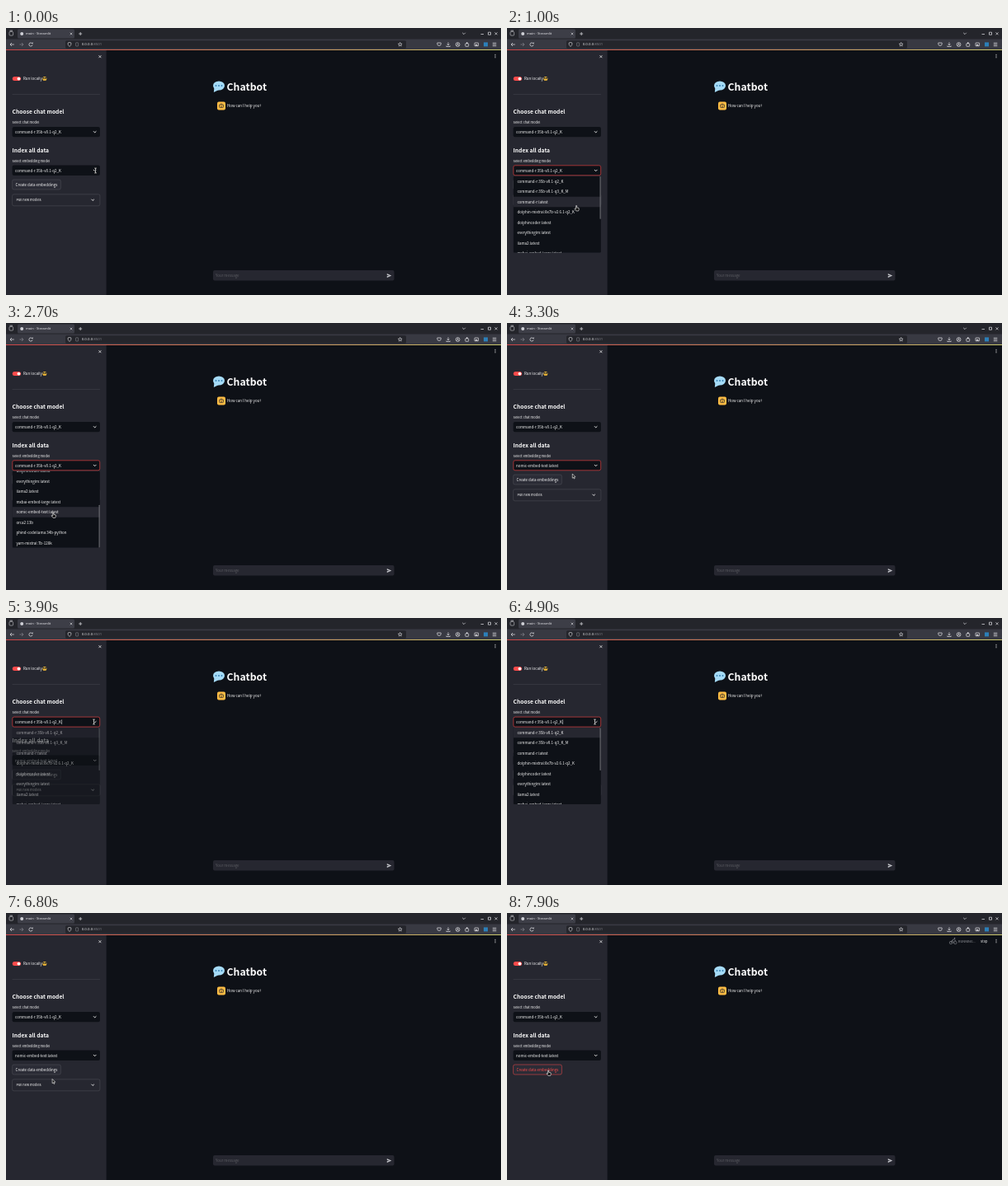
Animation of 600x324 px, one loop 8000 ms. Source, as an HTML page with a canvas:

```html
<!DOCTYPE html>
<html lang="en">
<head>
<meta charset="utf-8">
<title>Chatbot</title>
<style>
html, body { margin: 0; width: 100%; height: 100%; overflow: hidden; background: #0e1117; }
canvas { display: block; width: 600px; height: 324px; }
</style>
</head>
<body>
<canvas id="stage" width="600" height="324"></canvas>
<script>
const ctx = document.getElementById('stage').getContext('2d');
const LOOP = 8000;
const TAU = Math.PI * 2;
const SANS = '"Noto Sans CJK JP", "Noto Sans CJK SC", "Noto Sans CJK", "Noto Sans", sans-serif';
const CHROME_FONT = '"Noto Sans", sans-serif';
const BG = '#0e1117', SIDE = '#262730', FG = '#fafafa', RED = '#ff4b4b';
const FAINT = 'rgba(250,250,250,0.2)';
const ROW = 12.5, PANEL_H = 93, MAX_SCROLL = 56.5, THUMB = 52;

const MODELS = [
  'command-r:35b-v0.1-q2_K', 'command-r:35b-v0.1-q3_K_M', 'command-r:latest',
  'dolphin-mixtral:8x7b-v2.6.1-q2_K', 'dolphincoder:latest', 'everythinglm:latest',
  'llama2:latest', 'mxbai-embed-large:latest', 'nomic-embed-text:latest',
  'orca2:13b', 'phind-codellama:34b-python', 'yarn-mistral:7b-128k'
];

// time, x, y of the pointer's hot spot
const PATH = [
  [0, 108.5, 173], [550, 108.5, 173], [1400, 63, 251], [2250, 63, 251],
  [2650, 56.8, 230], [2950, 56.8, 230], [3700, 106.5, 126], [5250, 106.5, 126],
  [5950, 91, 258.5], [6200, 91, 258.5], [7000, 49.7, 191]
];

const clamp = (v, a, b) => Math.min(b, Math.max(a, v));
const ramp = (t, a, b) => clamp((t - a) / (b - a), 0, 1);
const ease = p => p * p * (3 - 2 * p);

function pointerAt(t) {
  for (let i = 1; i < PATH.length; i++) {
    const [t0, x0, y0] = PATH[i - 1], [t1, x1, y1] = PATH[i];
    if (t < t1) {
      const p = ease(ramp(t, t0, t1));
      return { x: x0 + (x1 - x0) * p, y: y0 + (y1 - y0) * p };
    }
  }
  const [, x, y] = PATH[PATH.length - 1];
  return { x, y };
}

function fill(x, y, w, h, color, r = 0) {
  ctx.fillStyle = color;
  ctx.beginPath();
  ctx.roundRect(x, y, w, h, r);
  ctx.fill();
}

function outline(x, y, w, h, color, r = 0, lw = 0.5) {
  ctx.strokeStyle = color;
  ctx.lineWidth = lw;
  ctx.beginPath();
  ctx.roundRect(x, y, w, h, r);
  ctx.stroke();
}

function line(points, color, lw = 0.7) {
  ctx.strokeStyle = color;
  ctx.lineWidth = lw;
  ctx.beginPath();
  points.forEach(([x, y], i) => i ? ctx.lineTo(x, y) : ctx.moveTo(x, y));
  ctx.stroke();
}

function poly(points, color) {
  ctx.fillStyle = color;
  ctx.beginPath();
  points.forEach(([x, y]) => ctx.lineTo(x, y));
  ctx.closePath();
  ctx.fill();
}

function dot(x, y, r, color) {
  ctx.fillStyle = color;
  ctx.beginPath();
  ctx.arc(x, y, r, 0, TAU);
  ctx.fill();
}

function ring(x, y, r, color, lw = 0.7, a = 0, b = TAU) {
  ctx.strokeStyle = color;
  ctx.lineWidth = lw;
  ctx.beginPath();
  ctx.arc(x, y, r, a, b);
  ctx.stroke();
}

// Laid out at ten times the size so small glyphs keep fractional advances.
function text(str, x, y, size, color = FG, weight = 400, family = SANS) {
  const px = family === SANS ? size / 1.117 : size;
  ctx.save();
  ctx.translate(x, y + size * 0.33);
  ctx.scale(0.1, 0.1);
  ctx.font = `${weight} ${px * 10}px ${family}`;
  ctx.fillStyle = color;
  ctx.fillText(str, 0, 0);
  ctx.restore();
}

const chevron = (x, y, color = FG, s = 1.7, lw = 0.9) =>
  line([[x - s, y - s / 2], [x, y + s / 2], [x + s, y - s / 2]], color, lw);

function cross(x, y, s, color, lw = 0.7) {
  line([[x - s, y - s], [x + s, y + s]], color, lw);
  line([[x - s, y + s], [x + s, y - s]], color, lw);
}

function drawBrowser() {
  const ink = '#e4e4e8', dim = '#85868d';
  fill(0, 0, 600, 14, '#24252b');
  fill(0, 13.5, 600, 13, '#383942');
  fill(14, 1.5, 69, 11, '#3d3e47', 1.5);
  outline(4, 4.5, 4.6, 4.6, ink, 1);
  line([[4.5, 3.2], [8, 3.2]], ink);
  dot(19.2, 7, 2, '#cfd0d6');
  text('main · Streamlit', 24, 7, 4.1, ink, 400, CHROME_FONT);
  cross(79, 7, 1.3, ink, 0.6);
  line([[88.2, 7], [92.2, 7]], ink);
  line([[90.2, 5], [90.2, 9]], ink);
  chevron(555, 6.7, ink, 1.8, 0.7);
  line([[575.5, 7.5], [579, 7.5]], ink);
  outline(584.5, 5.2, 3, 3, ink, 0, 0.7);
  cross(594, 6.8, 1.5, ink);

  line([[9.8, 20], [5, 20]], ink);
  line([[7, 18], [5, 20], [7, 22]], ink);
  line([[16.5, 20], [21, 20]], dim);
  line([[19, 18], [21, 20], [19, 22]], dim);
  ring(30, 20, 2.1, ink, 0.7, 0.2, 5.4);
  poly([[30.7, 18.8], [32.6, 19.2], [32.5, 17.2]], ink);

  fill(72, 15.3, 413, 9.4, '#24252b', 1.5);
  line([[77, 17.4], [79, 18.1], [78.7, 20.6], [77, 22.5], [75.3, 20.6], [75, 18.1], [77, 17.4]], ink, 0.6);
  outline(84.6, 17.8, 3, 4.2, dim, 0.5, 0.6);
  text('0.0.0.0', 91.7, 20, 4.35, ink, 400, CHROME_FONT);
  text(':8501', 105.1, 20, 4.35, dim, 400, CHROME_FONT);
  const star = Array.from({ length: 11 }, (_, i) => {
    const r = i % 2 ? 1.1 : 2.5, a = i * Math.PI / 5 - Math.PI / 2;
    return [477.7 + r * Math.cos(a), 20 + r * Math.sin(a)];
  });
  line(star, ink, 0.6);

  ring(525, 19.3, 2.2, ink, 0.7, 0, Math.PI);
  line([[522.8, 19.3], [522.8, 18], [527.2, 18], [527.2, 19.3]], ink);
  line([[536, 17.4], [536, 20.8]], ink);
  chevron(536, 20.3, ink, 1.4, 0.7);
  line([[533.8, 21.5], [533.8, 22.5], [538.2, 22.5], [538.2, 21.5]], ink);
  ring(547.6, 20, 2.4, ink);
  dot(547.6, 19.3, 0.8, ink);
  ring(547.6, 21.8, 1.3, ink, 0.6, Math.PI, TAU);
  outline(556.8, 18.8, 3.9, 3.5, ink, 0.5, 0.7);
  dot(558.8, 18.2, 0.9, ink);
  outline(568, 18, 4.6, 3.8, ink, 0.4, 0.7);
  poly([[568.4, 21.4], [570, 19.5], [572.2, 21.4]], ink);
  fill(579, 17.4, 5, 5, '#2c7fb8');
  for (const y of [18.2, 20, 21.8]) line([[589.8, y], [594.3, y]], ink);
}

function drawMain(running) {
  fill(121.5, 26, 479, 298, BG);
  for (const y of [32.2, 34, 35.8]) dot(593, y, 0.55, FG);
  if (running) drawRunning();

  // speech balloon
  ctx.fillStyle = '#a5dbf7';
  ctx.beginPath();
  ctx.ellipse(258, 70, 7, 5.5, 0, 0, TAU);
  ctx.fill();
  poly([[252.5, 72], [251.8, 78], [258, 75]], '#a5dbf7');
  for (const x of [254.5, 258, 261.5]) dot(x, 70, 1, '#3c85b5');
  text('Chatbot', 267.5, 71.3, 13.75, FG, 700);

  // bot avatar
  fill(256, 89.4, 10, 10, '#ffbd45', 2);
  outline(258.6, 92.7, 4.8, 3.9, '#33302a', 0.8, 0.8);
  dot(260.1, 94, 0.5, '#33302a');
  dot(261.9, 94, 0.5, '#33302a');
  line([[260, 95.5], [262, 95.5]], '#33302a', 0.5);
  line([[261, 92.5], [261, 91.4]], '#33302a', 0.7);
  text('How can I help you?', 268, 94.5, 5);

  fill(251, 294, 219.5, 12.6, SIDE, 2);
  text('Your message', 254, 300.4, 5, 'rgba(250,250,250,0.25)');
  poly([[461.8, 297.9], [467.3, 300.4], [461.8, 302.9], [461.8, 301], [465, 300.4], [461.8, 299.8]], '#c4c5ca');
}

function drawRunning() {
  const c = '#a3a5aa';
  ring(538, 36, 1.7, c, 0.5);
  ring(543.4, 36, 1.7, c, 0.5);
  line([[538, 36], [539.6, 33.2], [541.2, 35], [541, 37]], c, 0.6);
  line([[539.6, 33.2], [541.4, 31.7], [542.7, 33.2], [544, 33.2]], c, 0.6);
  dot(542.6, 30.7, 0.7, c);
  text('RUNNING...', 547, 34.3, 4.375, '#9a9ca2');
  text('Stop', 574, 34.3, 4.375);
}

function select(y, label, value, focused, caret) {
  text(label, 7.6, y - 11.1, 4.375);
  fill(7.6, y - 6.2, 106.3, 12.4, BG, 2);
  if (focused) outline(7.8, y - 6, 105.9, 12, RED, 2, 0.6);
  text(value, 11, y + 0.2, 5);
  if (caret) line([[67.6, y - 2.8], [67.6, y + 3]], FG, 0.5);
  chevron(107.7, y);
}

function drawSidebar(s) {
  fill(0, 26, 121.5, 298, SIDE);
  cross(113.9, 34.7, 1.5, FG, 0.7);

  fill(7.8, 59.1, 10.2, 5, RED, 2.5);
  dot(15.5, 61.6, 1.9, '#fff');
  text('Run locally', 21, 61.6, 5);
  dot(46.8, 61.5, 2.5, '#fcc63b');
  fill(44.5, 60.1, 2.2, 1.5, '#26262b', 0.6);
  fill(46.9, 60.1, 2.2, 1.5, '#26262b', 0.6);
  ring(46.8, 62.2, 1.1, '#7a4b16', 0.4, 0.2, Math.PI - 0.2);

  line([[7.6, 80.6], [113.9, 80.6]], FAINT, 0.4);

  text('Choose chat model', 7.6, 101.7, 7.5, FG, 600);
  select(126.1, 'Select chat model', MODELS[0], s.chatFocus, s.caret);
  text('Index all data', 7.6, 148.4, 7.5, FG, 600);
  select(172.8, 'Select embedding model', s.embedding, s.embedFocus, false);

  fill(7.6, 184, 58.8, 12, '#2b2c36', 2);
  outline(7.6, 184, 58.8, 12, s.btnHover ? RED : FAINT, 2);
  text('Create data embeddings', 11.6, 190, 5, s.btnHover ? RED : FG);

  if (s.expander) {
    outline(7.6, 201.8, 106.3, 14, FAINT, 2);
    text('Pull new models', 12.4, 208.7, 4.375);
    chevron(105.2, 208.6);
  }
}

function drawList(top, alpha, scroll, active) {
  if (alpha <= 0) return;
  ctx.save();
  ctx.globalAlpha = alpha;
  ctx.beginPath();
  ctx.roundRect(7.6, top, 106.3, PANEL_H, 1.5);
  ctx.clip();
  fill(7.6, top, 106.3, PANEL_H, BG);
  MODELS.forEach((name, i) => {
    const y = top + 6.2 + i * ROW - scroll;
    if (i === active) fill(7.6, y - ROW / 2, 106.3, ROW, SIDE);
    text(name, 12.4, y + 0.1, 5);
  });
  const travel = PANEL_H - THUMB;
  fill(112.6, top + travel * scroll / MAX_SCROLL, 1.1, THUMB, '#76777d', 0.5);
  ctx.restore();
}

function drawPointer(x, y, kind) {
  if (kind === 'text') {
    for (const [c, w] of [['#000', 1.5], ['#fff', 0.7]]) {
      line([[x, y - 2.8], [x, y + 2.8]], c, w);
      line([[x - 1.4, y - 2.9], [x + 1.4, y - 2.9]], c, w);
      line([[x - 1.4, y + 2.9], [x + 1.4, y + 2.9]], c, w);
    }
    return;
  }
  const shape = kind === 'hand'
    ? [[0, 0], [0.9, 0], [1, 2.3], [3.4, 2.9], [3.6, 4.6], [2.9, 6.4], [0.2, 6.4], [-1.7, 3.9], [-1.2, 3.2], [-0.1, 4]]
    : [[0, 0], [0, 5.2], [1.2, 4.2], [2, 6], [2.9, 5.6], [2.1, 3.8], [3.7, 3.7]];
  const pts = shape.map(([a, b]) => [x + a, y + b]);
  poly(pts, '#111');
  line([...pts, pts[0]], '#fff', 0.6);
}

function draw(t) {
  const { x, y } = pointerAt(t);
  const embedOpen = t >= 100 && t < 2950;
  const chatOpen = t >= 3750 && t < 6150;
  const scroll = MAX_SCROLL * ease(ramp(t, 1740, 2280));
  const embedAlpha = ramp(t, 80, 350) * (1 - ramp(t, 2950, 3150));
  const chatAlpha = ramp(t, 3750, 4000) * (1 - ramp(t, 6150, 6400));

  const hoverRow = clamp(Math.round((y - 186 + scroll) / ROW), 0, 11);
  const embedRow = t >= 1740 && t < 2280 ? 5 : t < 2950 ? hoverRow : 8;
  const chatRow = t < 6150 ? clamp(Math.round((y - 139) / ROW), 0, 7) : 7;

  const onButton = x < 66.5 && y > 184 && y < 196 && !embedOpen && !chatOpen;
  const onSelect = x < 114 && (Math.abs(y - 126) < 6.2 || (Math.abs(y - 173) < 6.2 && !chatOpen));
  const onList = (embedOpen && y > 179) || (chatOpen && y > 132 && y < 226);

  drawMain(t >= 7200);
  drawSidebar({
    chatFocus: chatOpen,
    embedFocus: t >= 100 && t < 3750,
    caret: chatOpen,
    embedding: t < 2950 ? MODELS[0] : MODELS[8],
    btnHover: onButton && t > 6200,
    expander: t < 7500
  });
  drawList(179.8, embedAlpha, scroll, embedRow);
  drawList(132.9, chatAlpha, 0, chatRow);
  drawBrowser();

  const strip = ctx.createLinearGradient(0, 0, 600, 0);
  strip.addColorStop(0, RED);
  strip.addColorStop(1, '#fffd80');
  fill(0, 26.3, 600, 0.7, strip);

  drawPointer(x, y, onSelect ? 'text' : onList || onButton ? 'hand' : 'arrow');
}

function tick() {
  draw(performance.now() % LOOP);
  requestAnimationFrame(tick);
}
tick();
</script>
</body>
</html>
```
